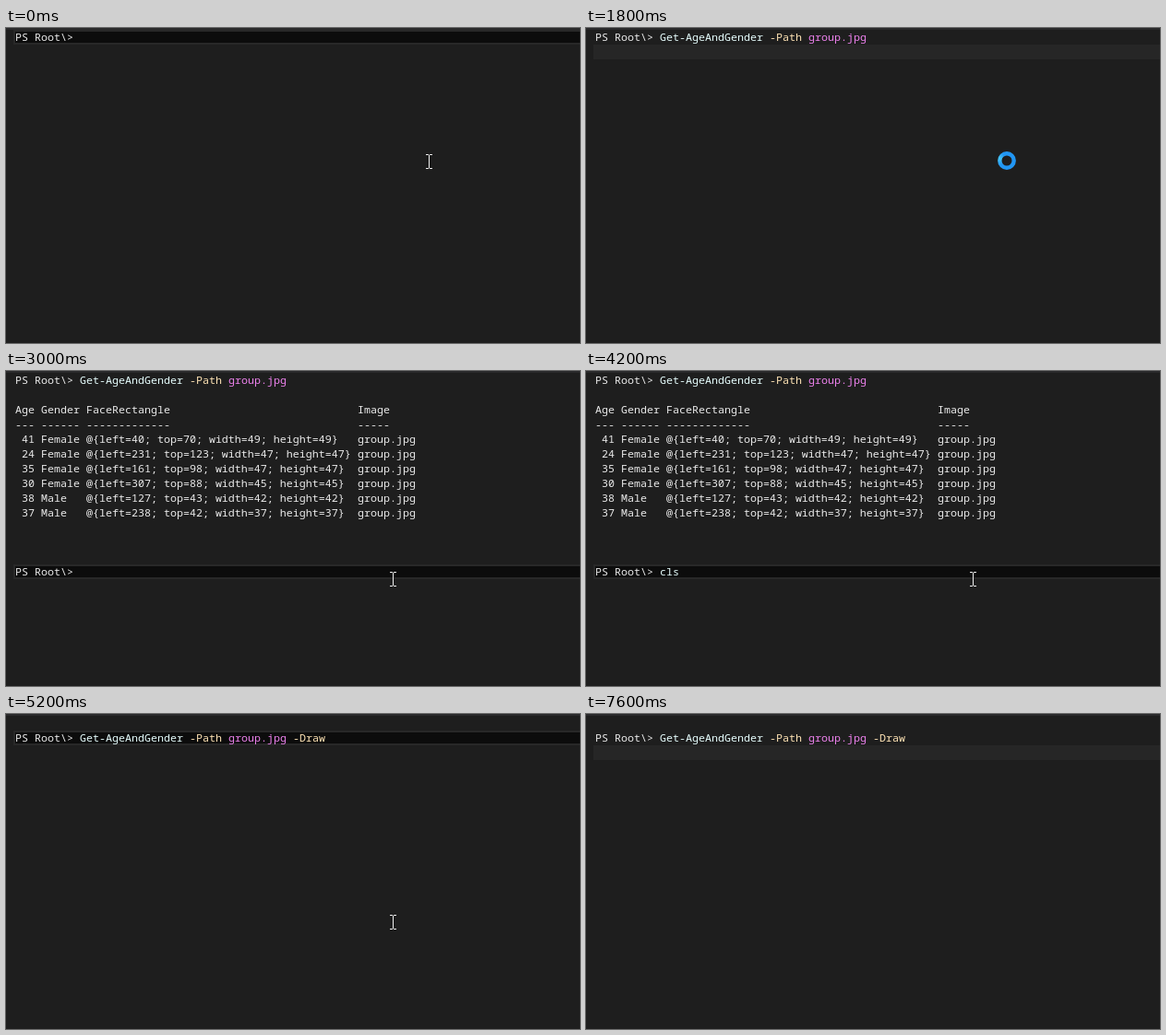
Recreate the animation shown at these times as an HTML page with a canvas. Size 622x342 px, loop 8 s.

```html
<!DOCTYPE html>
<html lang="en">
<head>
<meta charset="utf-8">
<title>Terminal session</title>
<style>
html, body { margin: 0; width: 100%; height: 100%; overflow: hidden; background: #1e1e1e; }
canvas { display: block; }
</style>
</head>
<body>
<canvas id="stage" width="622" height="342"></canvas>
<script>
const ctx = document.getElementById('stage').getContext('2d');
const W = 622, H = 342, LOOP = 8000, TICK = 200;
const LEFT = 10, CELL = 7, LINE = 16, TOP = 2;
const INK = '#ebebeb', COMMAND = '#e8ffff', PARAM = '#ffe4b5', ARG = '#ee82ee';
const EDGE = '#282828';

const PROMPT = 'PS Root\\>';
const QUERY = [['Get-AgeAndGender', COMMAND], [' -Path', PARAM], [' group.jpg', ARG], [' -Draw', PARAM]];
const SHORT = 32, FULL = 38;

// age, gender, left, top, width, height
const FACES = [
  [41, 'Female', 40, 70, 49, 49],
  [24, 'Female', 231, 123, 47, 47],
  [35, 'Female', 161, 98, 47, 47],
  [30, 'Female', 307, 88, 45, 45],
  [38, 'Male', 127, 43, 42, 42],
  [37, 'Male', 238, 42, 37, 37]
];

// Last value whose start time has been reached.
function at(keys, t) {
  let value = keys[0][1];
  for (const [start, v] of keys) if (t >= start) value = v;
  return value;
}

function text(str, col, row, color = INK) {
  ctx.fillStyle = color;
  ctx.fillText(str, LEFT + col * CELL, TOP + row * LINE + 12);
}

// Current line: a dark strip with a two pixel border, or a flat one while busy.
function bar(row, busy) {
  const y = TOP + row * LINE;
  ctx.fillStyle = busy ? '#262626' : EDGE;
  ctx.fillRect(8, y, W - 8, LINE);
  if (busy) return;
  ctx.fillStyle = '#0c0c0c';
  ctx.fillRect(10, y + 2, W - 10, LINE - 4);
}

function typed(parts, count, row) {
  let col = 10;
  for (const [str, color] of parts) {
    const shown = str.slice(0, Math.max(0, count));
    if (shown) text(shown, col, row, color);
    col += str.length;
    count -= str.length;
  }
}

function caret(row) {
  ctx.fillStyle = '#f0f0f0';
  ctx.fillRect(80, TOP + row * LINE, 1, 15);
}

function table() {
  const put = (row, age, gender, face, image) => {
    text(age, 0, row);
    text(gender, 4, row);
    text(face, 11, row);
    text(image, 53, row);
  };
  put(2, 'Age', 'Gender', 'FaceRectangle', 'Image');
  put(3, '---', '------', '-------------', '-----');
  FACES.forEach(([age, gender, l, t, w, h], i) =>
    put(4 + i, ' ' + age, gender, `@{left=${l}; top=${t}; width=${w}; height=${h}}`, 'group.jpg'));
}

function ibeam(x, y) {
  ctx.fillStyle = '#f0f0f0';
  ctx.fillRect(x, y - 7, 1, 14);
  for (const end of [y - 8, y + 7]) {
    ctx.fillRect(x - 3, end, 3, 1);
    ctx.fillRect(x + 1, end, 3, 1);
  }
}

function spinner(x, y, turn) {
  const g = ctx.createConicGradient(turn, x, y);
  g.addColorStop(0, '#2196f3');
  g.addColorStop(0.35, '#2196f3');
  g.addColorStop(0.5, '#45c4f6');
  g.addColorStop(0.62, '#2196f3');
  g.addColorStop(1, '#2196f3');
  ctx.strokeStyle = g;
  ctx.lineWidth = 4.4;
  ctx.beginPath();
  ctx.arc(x, y, 7.7, 0, Math.PI * 2);
  ctx.stroke();
}

function pointer(t) {
  if (t < 1400) ibeam(458, 145);
  else if (t < 2200) spinner(456, 144, (Math.min(t, 1800) - 1800) / 200 * 1.4 + 0.3);
  else if (t < 6000) {
    const p = Math.min(1, (t - 2200) / 800);
    const e = p * p * (3 - 2 * p);
    ibeam(Math.round(462 - 43 * e), Math.round(190 + 36 * e));
  } else if (t < 6800) spinner(417, 225, (t - 6600) / 200 * 1.4 - 0.2);
  else if (t < 7000) spinner(612, 268, 1.2);
}

function draw(t) {
  ctx.fillStyle = '#1e1e1e';
  ctx.fillRect(0, 0, W, H);
  ctx.fillStyle = '#2a2a2b';
  ctx.fillRect(0, 0, W, 2);

  if (t < 4400) {
    const busy = t >= 1400 && t < 2200;
    const row = t < 1400 ? 0 : busy ? 1 : 13;
    bar(row, busy);
    text(PROMPT, 0, 0);
    typed(QUERY, at([[0, 0], [400, 6], [600, 19], [800, 26], [1000, SHORT]], t), 0);
    if (t >= 2200) {
      table();
      text(PROMPT, 0, 13);
      typed([['cls', COMMAND]], at([[0, 0], [4000, 2], [4200, 3]], t), 13);
      if (at([[2200, true], [2800, false], [3200, true], [3600, false]], t)) caret(13);
    }
  } else {
    const busy = t >= 6000;
    bar(busy ? 2 : 1, busy);
    text(PROMPT, 0, 1);
    typed(QUERY, at([[4400, 0], [4800, SHORT], [5000, 35], [5200, FULL]], t), 1);
    if (t < 4800) caret(1);
  }
  pointer(t);
}

function frame(now) {
  const t = now % LOOP;
  ctx.font = '11.667px "Noto Sans Mono", "DejaVu Sans Mono", monospace';
  ctx.textBaseline = 'alphabetic';
  draw(Math.floor(t / TICK) * TICK);
  requestAnimationFrame(frame);
}
frame(0);
</script>
</body>
</html>
```
